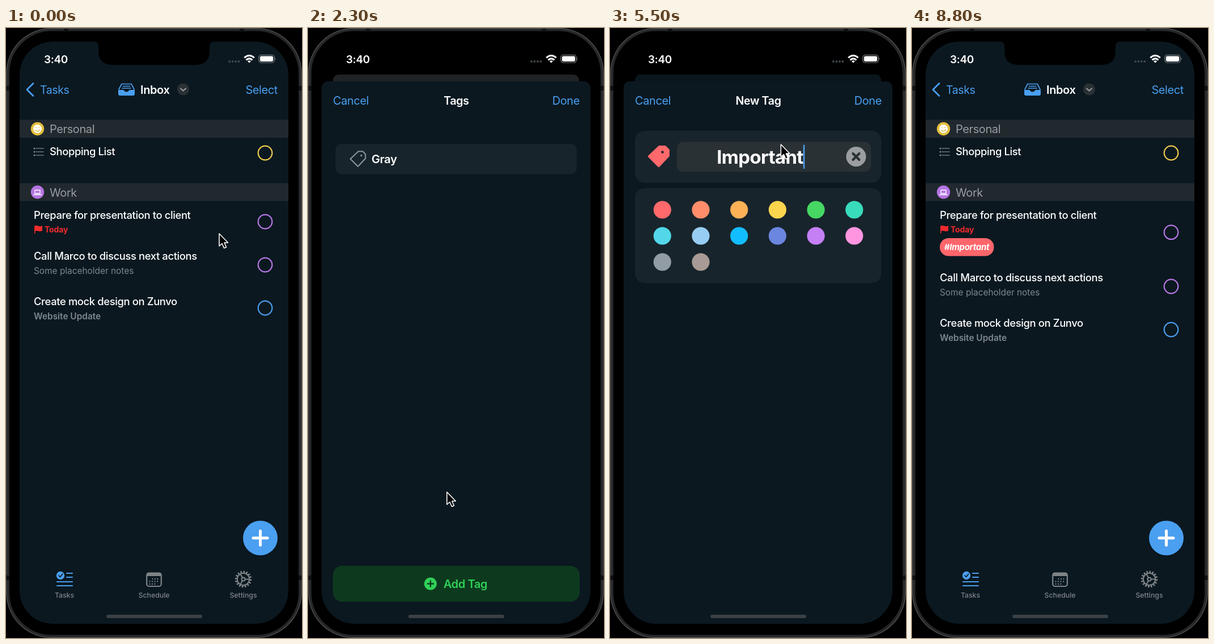
These frames come from a looping animation (522x1074 px, 9020 ms). An HTML page:

```html
<!DOCTYPE html>
<html lang="en">
<head>
<meta charset="utf-8">
<title>Tagging a task</title>
<style>
  html, body { margin: 0; width: 100%; height: 100%; overflow: hidden; background: #000; }
  svg { display: block; width: 100vw; height: 100vh; }
  text { font: 20px Inter, "Open Sans", sans-serif; letter-spacing: -.02em; fill: #fff; white-space: pre; }
  .blue { fill: #4a9ff0; }
  .title { font-size: 19.7px; font-weight: 600; }
  .section { fill: #979da2; }
  .task { font-size: 18.4px; font-weight: 500; }
  .note { font-size: 15.4px; letter-spacing: 0; fill: #7f888d; }
  .tab { font-size: 12.3px; font-weight: 500; letter-spacing: 0; fill: #7f8487; }
  .mid { text-anchor: middle; }
  .end { text-anchor: end; }
  .line { fill: none; stroke-linecap: round; stroke-linejoin: round; }
  .ring { fill: none; stroke-width: 2.2; }
  .card { fill: #18242c; }
  .bg { fill: #0b1820; }
</style>
</head>
<body>
<svg viewBox="0 0 522 1074">
  <defs>
    <clipPath id="screen"><rect x="24" y="24" width="474" height="1025" rx="58"/></clipPath>
    <path id="tag" d="M1-17H11L17-11V-1L0 17L-17 0Z" stroke-linejoin="round"/>
    <path id="bar" d="M24 0H498V31.500H24Z" fill="#21292e"/>
  </defs>

  <!-- phone body -->
  <rect width="522" height="1074"/>
  <rect x="3.500" y="3" width="515" height="1068" rx="77" fill="none" stroke="#262728" stroke-width="5"/>
  <rect x="1" y=".7" width="520" height="1072.600" rx="79" fill="none" stroke="#58595a" stroke-width="1.200"/>
  <path d="M102 4h8M412 4h8M3.500 102v8M3.500 964v8M518.500 102v8M518.500 964v8" stroke="#111" stroke-width="5"/>

  <g clip-path="url(#screen)">
    <g id="inbox">
      <rect class="bg" id="page" x="24" y="24" width="474" height="1025"/>
      <path class="line" d="M48 97.500L37 108.500L48 119.500" stroke="#4a9ff0" stroke-width="2.800"/>
      <text class="blue" x="60" y="115.500" style="font-size:19.500px">Tasks</text>
      <path class="blue" d="M198 109h8.500q1.500 0 2 1.500 1 2 4 2t4-2q.5-1.500 2-1.500h8.500v7q0 3-3 3h-23q-3 0-3-3Z"/>
      <path class="line" d="M199 108L204 98.500H221L226 108M206.500 102.500h12M205 106h15" stroke="#4a9ff0" stroke-width="1.700"/>
      <text x="237" y="115.500" font-weight="600" style="font-weight:600">Inbox</text>
      <circle cx="312.500" cy="108" r="10.500" fill="#2a3135"/>
      <path class="line" d="M308 106.500l4.500 4 4.500-4" stroke="#9ba1a5" stroke-width="2"/>
      <text class="blue end" x="479" y="115.500">Select</text>

      <use href="#bar" y="161.500"/>
      <circle cx="55.500" cy="177.500" r="11.700" fill="#e4bf3d"/>
      <circle cx="55.500" cy="177.500" r="7.500" fill="#fff"/>
      <path class="line" d="M53 175v.5M58 175v.5M51.500 179.500q4 4.500 8 0" stroke="#e4bf3d" stroke-width="1.500"/>
      <text class="section" x="77" y="185">Personal</text>
      <path class="line" d="M50 212h.1M50 218h.1M50 224h.1" stroke="#7d868b" stroke-width="3"/>
      <path class="line" d="M53 212h13M53 218h13M53 224h13" stroke="#6b757b" stroke-width="1.500"/>
      <text class="task" x="77" y="223.500">Shopping List</text>
      <circle class="ring" cx="457" cy="220" r="12.300" stroke="#efcb4d"/>

      <use href="#bar" y="273.300"/>
      <circle cx="55.500" cy="289" r="11.700" fill="#b574e2"/>
      <path class="line" d="M51 291.500v-6h9v6ZM48.500 293.500h14" stroke="#fff" stroke-width="1.300"/>
      <text class="section" x="77" y="296.500">Work</text>

      <g id="swiped">
        <g id="lead">
          <text class="task" x="49" y="335.700">Prepare for presentation to client</text>
          <path d="M50 348.500q3.500-1.500 7 0t7-.5v9q-3.500 1.500-7 .5t-5.500 0v4.500H50Z" fill="#f22a2c"/>
          <text x="68" y="360" style="font-size:14px;font-weight:700;letter-spacing:-.01em;fill:#f22a2c">Today</text>
        </g>
        <g id="chip">
          <rect x="49" y="370" width="95.500" height="31.500" rx="15.500" fill="#ff666b"/>
          <text class="mid" x="96.500" y="391" style="font-size:15px;font-weight:700;font-style:italic">#Important</text>
        </g>
        <circle class="ring" id="leadRing" cx="457" cy="341" r="12.300" stroke="#b877e6"/>
      </g>
      <g id="rest">
        <text class="task" x="49" y="407.700">Call Marco to discuss next actions</text>
        <text class="note" x="49" y="433">Some placeholder notes</text>
        <circle class="ring" cx="457" cy="417" r="12.300" stroke="#b877e6"/>
        <text class="task" x="49" y="487.700">Create mock design on Zunvo</text>
        <text class="note" x="49" y="513" style="font-weight:600">Website Update</text>
        <circle class="ring" cx="457" cy="493" r="12.300" stroke="#4a9ff0"/>
      </g>

      <g class="action">
        <rect y="305" width="91" height="72" fill="#2fd159"/>
        <use href="#tag" transform="translate(45.500 341.500) scale(.74)" fill="#fff" stroke="#fff" stroke-width="5"/>
        <circle cx="51" cy="336" r="1.900" fill="#2fd159"/>
      </g>
      <g class="action">
        <rect y="305" width="91" height="72" fill="#4aa1f3"/>
        <path d="M31 336v-3q0-3 3-3h7l3 2.500h13q3 0 3 3v.5ZM31 338h29v12q0 3-3 3H34q-3 0-3-3Z" fill="#fff"/>
      </g>
      <g class="action">
        <rect y="305" width="91" height="72" fill="#ff453a"/>
        <path class="line" d="M34 332h22M40.500 331v-4h9v4M36 332l1.500 22h15l1.500-22M41 337l.5 12M45 337v12M49 337l-.5 12" stroke="#fff" stroke-width="2.300"/>
      </g>

      <circle cx="448.500" cy="900" r="31" fill="#08121a" opacity=".5"/>
      <circle class="blue" cx="448.500" cy="898" r="30.500"/>
      <path class="line" d="M436 898h25M448.500 885.500v25" stroke="#fff" stroke-width="5"/>

      <circle class="blue" cx="96" cy="964" r="7.200"/>
      <path class="line" d="M93 964l2.500 2.500 4-5" stroke="#0b1820" stroke-width="1.700"/>
      <path class="line" d="M107 960h10M107 967h10M90 975h27M90 982h27" stroke="#4a9ff0" stroke-width="2.200"/>
      <text class="tab mid blue" x="103" y="1003">Tasks</text>
      <rect x="248.200" y="959.500" width="25.600" height="23.500" rx="4" fill="none" stroke="#7f8487" stroke-width="2.200"/>
      <path d="M248 960h26v5h-26Z" fill="#7f8487"/>
      <path class="line" d="M258.500 970h12M253.500 974.500h16M253.500 979h12" stroke="#7f8487" stroke-width="2.300" stroke-dasharray="0 4.500"/>
      <text class="tab mid" x="261" y="1003">Schedule</text>
      <g fill="none" stroke="#7f8487" stroke-width="2">
        <circle cx="418.500" cy="970.500" r="13" pathLength="32" stroke-dasharray="1 1" stroke-width="3.500"/>
        <circle cx="418.500" cy="970.500" r="10.700"/>
        <circle cx="418.500" cy="970.500" r="3"/>
        <path d="M421.500 970.500h7M417 968l-3.500-6.500M417 973l-3.500 6.500"/>
      </g>
      <text class="tab mid" x="418.500" y="1003">Settings</text>
      <rect id="dim" x="24" y="24" width="474" height="1025" fill="#282828"/>
    </g>

    <g id="tagsSheet">
      <rect class="bg" x="24" y="94" width="474" height="1060" rx="11"/>
      <text class="blue" x="44" y="135">Cancel</text>
      <text class="title mid" x="261.500" y="135">Tags</text>
      <text class="blue end" x="479" y="135">Done</text>
      <rect class="card" id="tagList" x="48.500" y="204" width="425.500" height="53.500" rx="11"/>
      <use href="#tag" transform="translate(88 230.500) scale(.78)" fill="none" stroke="#8a9399" stroke-width="2.700"/>
      <circle cx="94" cy="224.500" r="1.700" fill="#8a9399"/>
      <text class="title" x="112" y="238" style="font-size:20.300px">Gray</text>
      <g id="newRow">
        <path d="M112 257.300H474" stroke="#313a41" stroke-width="1.500"/>
        <use id="newRowTag" href="#tag" transform="translate(88 283.800) scale(.78)" stroke="#f7646b" stroke-width="2.700"/>
        <circle id="newRowHole" cx="94" cy="277.800" r="1.700"/>
        <text class="title" x="112" y="291.500" style="font-size:20.300px">Important</text>
      </g>
      <rect x="44" y="947" width="435" height="63" rx="16" fill="#0d3a1e"/>
      <circle cx="216" cy="978.500" r="11" fill="#30d158"/>
      <path class="line" d="M211 978.500h10M216 973.500v10" stroke="#0d3a1e" stroke-width="2.400"/>
      <text x="239" y="985.800" style="font-weight:600;fill:#30d158">Add Tag</text>
      <rect id="tagsDim" x="24" y="94" width="474" height="1060" rx="11"/>
    </g>

    <g id="newSheet">
      <rect class="bg" x="24" y="94" width="474" height="1060" rx="11"/>
      <text class="blue" x="44" y="135">Cancel</text>
      <text class="title mid" x="261.500" y="135">New Tag</text>
      <text class="blue end" x="479" y="135">Done</text>
      <rect class="card" x="44" y="181" width="434.500" height="91.500" rx="17"/>
      <use id="bigTag" href="#tag" transform="translate(86 226)" stroke-width="4"/>
      <circle cx="92.500" cy="218.500" r="2.300" class="card"/>
      <rect x="118" y="200.500" width="342" height="52.500" rx="11" fill="#2a3135"/>
      <text class="mid" id="typed" x="264.500" y="239" style="font-size:33px;font-weight:700"></text>
      <rect class="blue" id="caret" y="205.500" width="2.500" height="42.500" rx="1"/>
      <g id="clear">
        <circle cx="434" cy="226.500" r="17.500" fill="#9a9ea1"/>
        <path class="line" d="M428.500 221l11 11M439.500 221l-11 11" stroke="#2a3135" stroke-width="4.200"/>
      </g>
      <rect class="card" x="44" y="282" width="434.500" height="167" rx="17"/>
      <g id="swatches"></g>
    </g>
  </g>

  <!-- status bar, notch and home indicator -->
  <path d="M150 20H372V24H367Q359 24 359 32V40Q359 65 334 65H188Q163 65 163 40V32Q163 24 155 24H150Z"/>
  <text x="67" y="62" style="font-size:19px;font-weight:600">3:40</text>
  <path class="line" d="M394 59h.1M399.500 59h.1M405 59h.1M410.300 59h.1" stroke="#3f474c" stroke-width="3.800"/>
  <g fill="none" stroke="#fff" stroke-width="3">
    <path d="M420.300 52.300Q429 44.700 437.700 52.300M423.500 56.300Q429 51.500 434.500 56.300"/>
    <path d="M426 58.500Q429 56 432 58.500L429 61.500Z" fill="#fff" stroke="none"/>
  </g>
  <rect x="446" y="47.500" width="27" height="13.500" rx="4" fill="none" stroke="#858b8f" stroke-width="1.200"/>
  <rect x="448" y="49.500" width="23" height="9.500" rx="2.300" fill="#fff"/>
  <path d="M474.500 52q2 2.200 0 4.500Z" fill="#858b8f"/>
  <rect x="177" y="1033" width="169" height="6" rx="3" fill="#3a4044"/>

  <path id="cursor" d="M0 0V22L5 17.500L8.500 25.500L12.500 24L9 16H15.500Z" fill="#000" stroke="#fff" stroke-width="1.600" stroke-linejoin="round"/>
</svg>
<script>
const LOOP = 9020;
const $ = id => document.getElementById(id);
const set = (id, attrs) => { for (const key in attrs) $(id).setAttribute(key, attrs[key]); };
const show = (id, visible) => set(id, { visibility: visible ? "visible" : "hidden" });
const actions = document.querySelectorAll(".action");

const palette = ["#ff696b", "#ff8d6b", "#ffb155", "#fbd54d", "#46d863", "#38dbbb", "#52d7e8",
  "#97cdf2", "#12bdff", "#6a86df", "#c580f5", "#ff95e0", "#929ca4", "#a89a94"];
$("swatches").innerHTML = palette.map((color, i) =>
  `<circle cx="${92.3 + i % 6 * 67.7}" cy="${320 + Math.floor(i / 6) * 46}" r="15.600" fill="${color}"/>`).join("");

const ramp = (t, start, length) => Math.min(1, Math.max(0, (t - start) / length));
const easeOut = (t, start, length) => 1 - (1 - ramp(t, start, length)) ** 3;

// time, x, y of the pointer tip
const pointerPath = [
  [0, 376, 362], [250, 376, 362], [600, 390, 345], [750, 390, 345], [1150, 230, 343],
  [1350, 230, 343], [1700, 276, 346], [1900, 276, 346], [2300, 245, 817], [2600, 280, 962],
  [4750, 280, 962], [5100, 88, 317], [5250, 88, 317], [5700, 452, 126], [5900, 452, 126],
  [6400, 322, 263], [6550, 300, 282], [6700, 300, 282], [7050, 464, 131], [7750, 464, 131],
  [8450, 464, 3]
];

function pointerAt(t) {
  const next = pointerPath.findIndex(stop => stop[0] > t);
  if (next < 0) return pointerPath.at(-1).slice(1);
  const [t0, x0, y0] = pointerPath[next - 1], [t1, x1, y1] = pointerPath[next];
  const u = ramp(t, t0, t1 - t0), k = u * u * (3 - 2 * u);
  return [x0 + (x1 - x0) * k, y0 + (y1 - y0) * k];
}

// Card pushed back behind a sheet: shrinks about its top centre
const recede = (top, drop, p) =>
  `translate(261 ${top + drop * p}) scale(${1 - 0.0844 * p}) translate(-261 ${-top})`;

function drawInbox(t, tagsUp) {
  set("inbox", { transform: recede(24, 58, tagsUp) });
  const rx = 58 - 47 * tagsUp;
  set("page", { rx });
  set("dim", { rx, opacity: 0.7 * tagsUp });

  const swipe = t < 2400 ? 160 * easeOut(t, 750, 400) + 110 * easeOut(t, 1150, 300) : 0;
  set("swiped", { transform: `translate(${-swipe} 0)` });
  actions.forEach((action, i) => {
    action.setAttribute("transform", `translate(${498 - swipe * (3 - i) / 3} 0)`);
    action.setAttribute("visibility", swipe > 0 ? "visible" : "hidden");
  });

  const grown = easeOut(t, 7100, 400), chip = ramp(t, 7200, 460);
  set("rest", { transform: `translate(0 ${38 * grown})` });
  set("leadRing", { cy: 341 + 18.7 * grown });
  set("lead", { transform: `translate(0 ${t > 7200 ? 19 * (1 - chip) : 0})` });
  set("chip", { opacity: chip });
}

function drawTags(t, tagsUp, newUp) {
  set("tagsSheet", { transform: `translate(0 ${955 * (1 - tagsUp)}) ${recede(94, -12, newUp)}` });
  set("tagsDim", { opacity: 0.1 * newUp });
  const added = t > 5800, chosen = t > 6620;
  show("newRow", added);
  set("tagList", { height: added ? 106.5 : 53.5 });
  set("newRowTag", { fill: chosen ? "#f7646b" : "none" });
  set("newRowHole", { fill: chosen ? "#18242c" : "#f7646b" });
}

function drawNewTag(t, newUp) {
  set("newSheet", { transform: `translate(0 ${955 * (1 - newUp)})` });
  const color = t > 5180 ? palette[0] : "#82bce0";
  set("bigTag", { fill: color, stroke: color });
  const name = "Important".slice(0, Math.max(0, Math.floor((t - 3780) / 100)));
  $("typed").textContent = name;
  set("caret", { x: 264.5 + (name ? $("typed").getComputedTextLength() / 2 : 0) });
  set("clear", { opacity: name ? 1 : 0 });
}

function draw() {
  const t = performance.now() % LOOP;
  const tagsUp = easeOut(t, 1850, 450) - easeOut(t, 7200, 500);
  const newUp = easeOut(t, 2750, 500) - easeOut(t, 5800, 500);
  drawInbox(t, tagsUp);
  drawTags(t, tagsUp, newUp);
  drawNewTag(t, newUp);
  set("cursor", { transform: `translate(${pointerAt(t)})` });
  show("cursor", t < 8550);
  requestAnimationFrame(draw);
}
draw();
</script>
</body>
</html>
```
